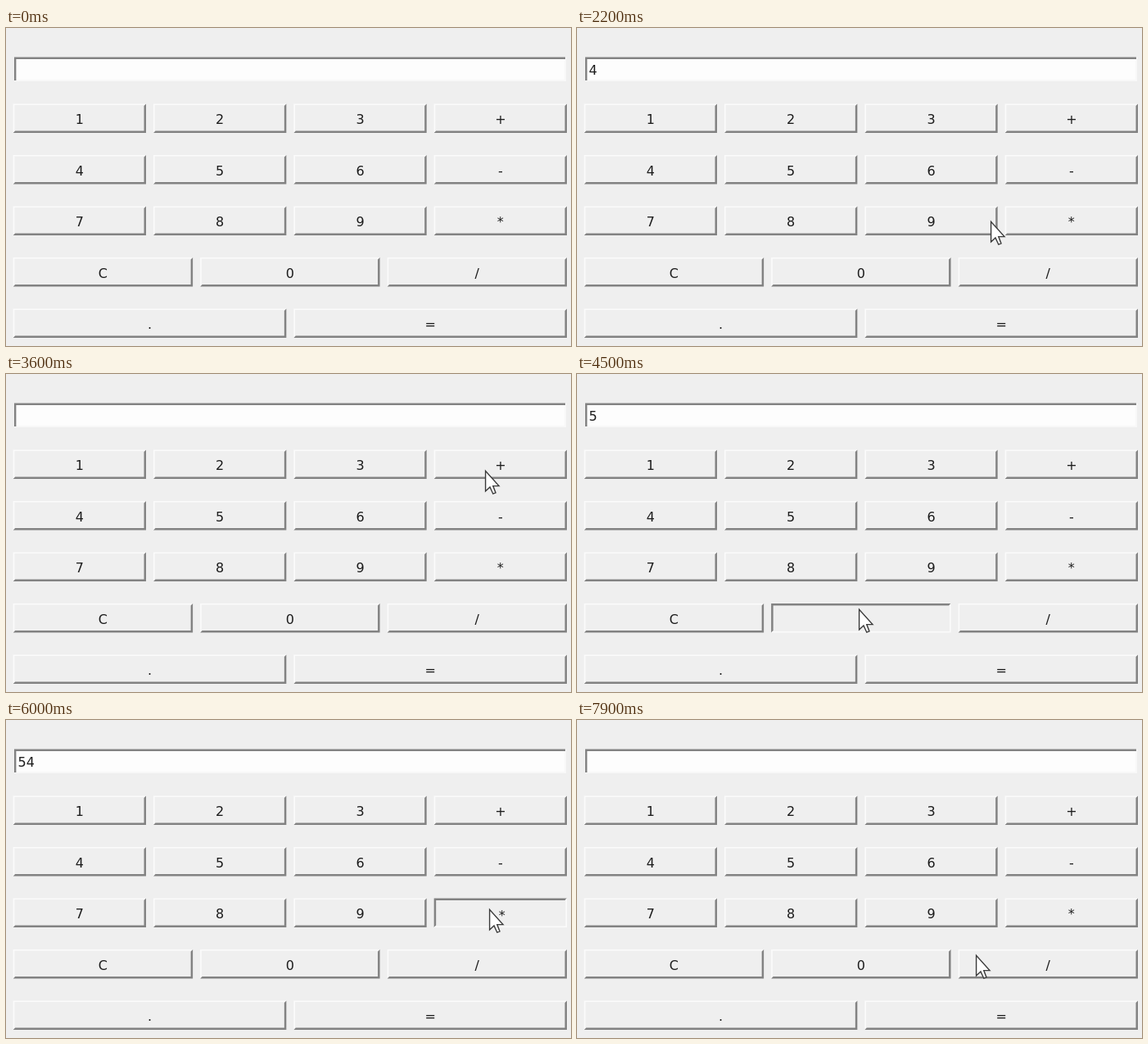
An HTML page that plays this animation: 690x388 px, repeating every 8 s.

```html
<!DOCTYPE html>
<html lang="en">
<head>
<meta charset="utf-8">
<title>Calculator</title>
<style>
  html, body { margin: 0; width: 100%; height: 100%; overflow: hidden; background: #efefef; }
  svg { display: block; width: 690px; height: 388px; }
  text { font: 16px "DejaVu Sans", sans-serif; fill: #1c1c1c; }
  .label { text-anchor: middle; }
</style>
</head>
<body>
<svg viewBox="0 0 690 388">
  <rect width="690" height="388" fill="#efefef"/>
  <rect x="10" y="35.5" width="674" height="29.5" fill="#f8f8f8"/>
  <rect x="12" y="38" width="670" height="25" fill="#fdfdfd"/>
  <path d="M10 64V35.5H683V38H12.4V64Z" fill="#828282"/>
  <text id="display" x="14.5" y="57"></text>
  <g id="keys"></g>
  <path id="cursor" d="M.6 .4V25L6 20L9.8 28.2L13 26.9L9.8 18.6H17Z"
        fill="#fff" stroke="#3a3a3a" stroke-width="1.4"/>
</svg>
<script>
const LOOP = 8000, STEP = 100, HOLD = 90;
const LEFT = 8.7, RIGHT = 685, TOP = 92.5, GAP = 9, HEIGHT = 35.5, PITCH = 62.5;
const LIGHT = ["#fbfbfb", 1.6], DARK = ["#828282", 2.5];
const $ = id => document.getElementById(id);

function make(tag, attrs, parent) {
  const el = document.createElementNS("http://www.w3.org/2000/svg", tag);
  for (const name in attrs) el.setAttribute(name, attrs[name]);
  return parent.appendChild(el);
}

// Each row spreads its keys over the same width with a fixed gap.
const keys = {};
["123+", "456-", "789*", "C0/", ".="].forEach((row, r) => {
  const w = (RIGHT - LEFT - GAP * (row.length - 1)) / row.length;
  const y = TOP + r * PITCH;
  [...row].forEach((name, c) => {
    const x = LEFT + c * (w + GAP);
    const label = make("text", { class: "label", x: x + w / 2, y: y + 24.5 }, $("keys"));
    label.textContent = name;
    keys[name] = {
      x, y, w, label,
      upper: make("path", {}, $("keys")),
      lower: make("path", {}, $("keys"))
    };
  });
});

function drawKey({ x, y, w, label, upper, lower }, down) {
  const x2 = x + w, y2 = y + HEIGHT;
  const [upColor, a] = down ? DARK : LIGHT;
  const [lowColor, b] = down ? LIGHT : DARK;
  upper.setAttribute("fill", upColor);
  upper.setAttribute("d", `M${x} ${y2}V${y}H${x2}l${-a} ${a}H${x + a}V${y2 - a}Z`);
  lower.setAttribute("fill", lowColor);
  lower.setAttribute("d", `M${x2} ${y}V${y2}H${x}l${b} ${-b}H${x2 - b}V${y + b}Z`);
  label.setAttribute("transform", down ? "translate(2 2)" : "");
}

// Where the pointer rests, and which key it clicks there.
const stops = [
  { x: 95, y: 248, arrive: 1200, leave: 1200 },
  { x: 120, y: 166, arrive: 1500, leave: 2000, key: "4", press: 1600 },
  { x: 505, y: 236, arrive: 2200, leave: 2200 },
  { x: 638, y: 340, arrive: 2500, leave: 2800 },
  { x: 585, y: 118, arrive: 3200, leave: 3600, key: "+", press: 3400 },
  { x: 288, y: 178, arrive: 3900, leave: 4200, key: "5", press: 4100 },
  { x: 344, y: 287, arrive: 4400, leave: 4700, key: "0", press: 4500 },
  { x: 524, y: 349, arrive: 4900, leave: 5500, key: "=", press: 5000 },
  { x: 590, y: 231, arrive: 5900, leave: 6200, key: "*", press: 6000 },
  { x: 278, y: 127, arrive: 6500, leave: 6800, key: "2", press: 6600 },
  { x: 530, y: 352, arrive: 7200, leave: 7400, key: "=", press: 7200 },
  { x: 487, y: 287, arrive: 7700, leave: LOOP, key: "/", press: 7710 }
];

function pointerAt(t) {
  const i = stops.findIndex(s => t <= s.leave);
  const to = stops[i], from = stops[i - 1] || to;
  const k = t >= to.arrive ? 1 : (t - from.leave) / (to.arrive - from.leave);
  return [from.x + (to.x - from.x) * k, from.y + (to.y - from.y) * k];
}

const operations = {
  "+": (a, b) => a + b, "-": (a, b) => a - b,
  "*": (a, b) => a * b, "/": (a, b) => a / b
};

function enter(state, key) {
  if (key === "=") return { shown: String(operations[state.op](state.stored, +state.shown)) };
  if (key in operations) return { shown: "", op: key, stored: +state.shown };
  return { ...state, shown: state.shown + key };
}

function render(time) {
  const t = Math.floor(time % LOOP / STEP) * STEP;
  const clicks = stops.filter(s => s.key && s.press <= t);
  const held = clicks.find(s => t < s.press + HOLD);
  for (const name in keys) drawKey(keys[name], held?.key === name);

  const entered = clicks.filter(s => s !== held).map(s => s.key);
  $("display").textContent = entered.reduce(enter, { shown: "" }).shown;

  const visible = t >= stops[0].arrive;
  $("cursor").style.display = visible ? "" : "none";
  if (visible) $("cursor").setAttribute("transform", `translate(${pointerAt(t)})`);
}

const began = performance.now();
function tick() {
  render(performance.now() - began);
  requestAnimationFrame(tick);
}
tick();
</script>
</body>
</html>
```
